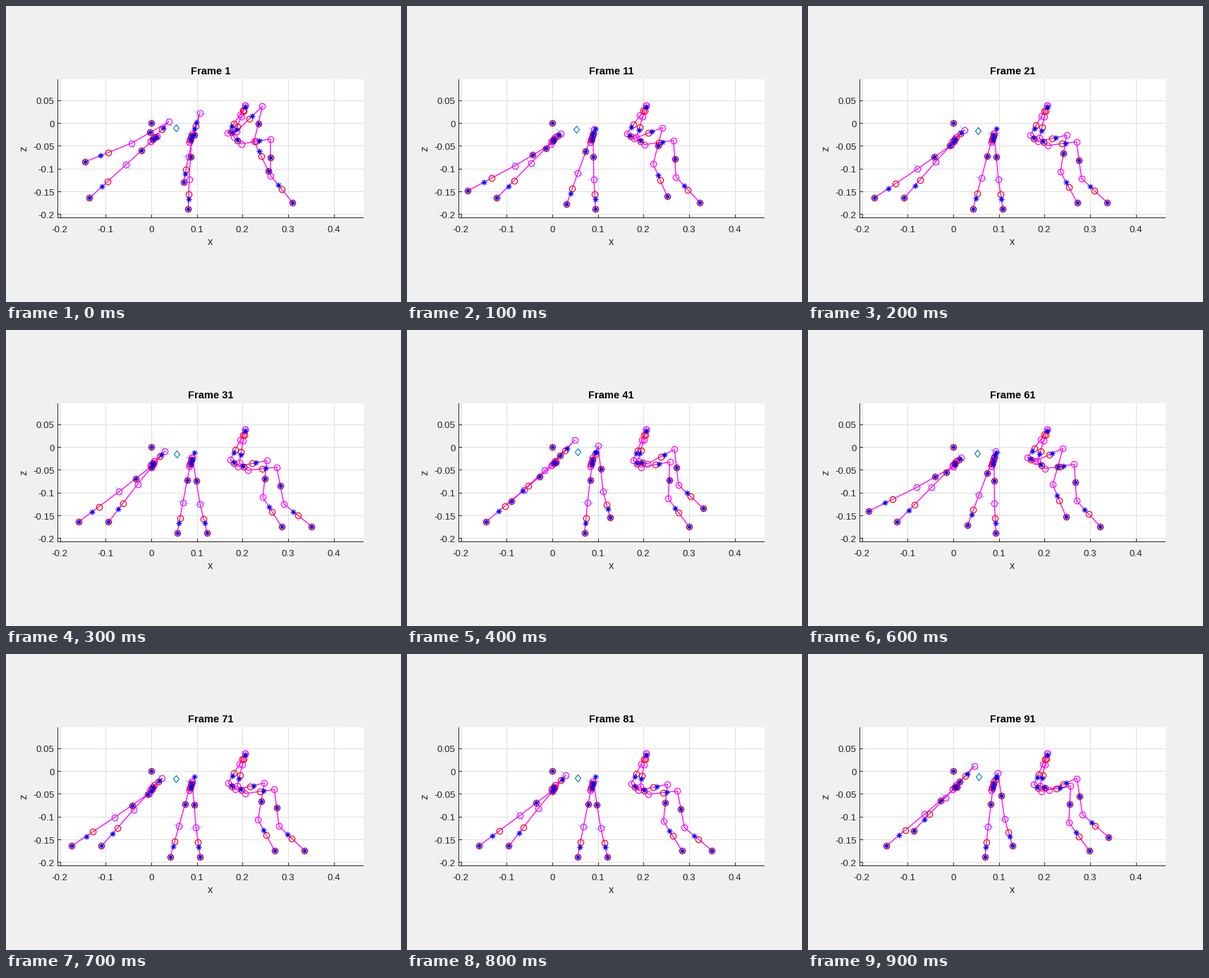
A matplotlib script that plays this animation: 560x420 px, repeating every 1000 ms.

```python
import numpy as np
import matplotlib.pyplot as plt
from collections import namedtuple
from matplotlib.animation import FuncAnimation
from matplotlib.patches import Rectangle

W, H = 560, 420
PT = 0.9            # points per pixel at 80 dpi
FRAMES, PERIOD = 10, 51
SPEED = 0.9         # pixels a planted foot travels per step
INK, GRID = "#262626", "#dfdfdf"

plt.rcParams["font.family"] = "Liberation Sans"

# A joint rests at (x, y) and follows its foot: per pixel of travel and per pixel of lift.
Joint = namedtuple("Joint", "rest travel lift")
# "land" is where the foot touches down, "pull" how far it is drawn back per pixel of lift.
Pair = namedtuple("Pair", "base joints foot_rest land ground height pull stars")
# The two sides differ in when they step and how early in the swing the foot peaks.
Side = namedtuple("Side", "lift_off swing skew shift")

REAR_STARS = (0.55, 0.62, 0.5, 0.66)
HIND = Pair([(205, 192), (210, 186)],
            [Joint((213, 185), (0.43, -0.5), (0.38, -0.47)),
             Joint((169, 225), (0.62, -0.25), (0.24, -0.63))],
            117, 86, 272, 52, 0, REAR_STARS)
MIDDLE = Pair([(260, 193), (262, 187)],
              [Joint((263, 181), (0.03, 0), (0.3, -0.77)),
               Joint((259, 245), (0.57, 0.05), (0.07, -0.82))],
              257.5, 226, 288, 39, 0, REAR_STARS)
FRONT = Pair([(339, 141)],
             [Joint((333, 156), (0.09, 0.03), (0.03, -0.03)),
              Joint((322, 185), (0.3, 0.1), (0.03, -0.04)),
              Joint((333, 195), (0.33, 0.13), (0.1, -0.29)),
              Joint((374, 188), (0.33, 0.22), (0, -0.85)),
              Joint((374, 240), (0.7, 0.22), (0.02, -0.9))],
             405, 374, 278.5, 46, -0.62, (0.1, 0.65, 0.45, 0.62, 0.5, 0.34))
SIDES = [Side(45, 19, 0.6, 0), Side(36, 15, 1.5, 31)]

ORIGIN, THORAX = (206, 166), (267, 174)
GAP = [(np.nan, np.nan)]


def smoothstep(t):
    t = np.clip(t, 0, 1)
    return t * t * (3 - 2 * t)


def foot_motion(pair, side, phase):
    """Foot x and lift: an even stance, then a swing back to the landing point."""
    stance = PERIOD - side.swing
    step = (phase - side.lift_off - side.swing) % PERIOD
    u = max(0, step - stance) / side.swing
    lift = pair.height * np.sin(np.pi * u ** side.skew)
    travel = SPEED * min(step, stance) * (1 - smoothstep((u - 0.25) / 0.55))
    return pair.land + side.shift + travel + pair.pull * lift, lift


def leg_points(pair, side, phase):
    x, lift = foot_motion(pair, side, phase)
    joints = [np.array(j.rest) + (x - pair.foot_rest) * np.array(j.travel)
              + lift * np.array(j.lift) for j in pair.joints]
    return np.array([*pair.base, *joints, (x, pair.ground - lift)])


def body_centre(phase):
    turn = 2 * np.pi / PERIOD
    return [(240.5 - np.cos(turn * (phase - 10)), 174.3 - 2.4 * np.cos(turn * (phase + 2)))]


def joint_axis(joint, end, half=8):
    """Short stroke through a joint, square to the segment that follows."""
    dx, dy = end - joint
    normal = half * np.array([-dy, dx]) / np.hypot(dx, dy)
    return [joint - normal, joint + normal] + GAP


fig = plt.figure(figsize=(W / 80, H / 80), dpi=80, facecolor="#f0f0f0")
ax = fig.add_axes([0, 0, 1, 1])
# Whole numbers fall just short of pixel centres, so markers round onto them.
ax.set_xlim(-0.49, W - 0.49)
ax.set_ylim(H - 0.49, -0.49)
ax.axis("off")


def stroke(xs, ys, color):
    ax.plot(np.round(xs), np.round(ys), color=color, lw=PT, snap=False, zorder=1,
            solid_capstyle="projecting")


def label(x, y, text, size=13.33, color=INK, **kw):
    return ax.text(x - 0.8, y, text, fontsize=size * PT, color=color, **kw)


LEFT, RIGHT, TOP, BOTTOM = 73, 506, 104, 300
ax.add_patch(Rectangle((LEFT - 0.5, TOP - 0.5), RIGHT - LEFT + 1, BOTTOM - TOP + 1,
                       fc="white", ec="none", zorder=0))
x_ticks = [(206 + 64.7 * n, f"{n / 10:g}") for n in range(-2, 5)]
y_ticks = [(166 - 32.35 * n, f"{n / 20:g}") for n in range(-4, 2)]
for x, text in x_ticks:
    stroke([x, x], [TOP, BOTTOM], GRID)
    label(x, 320.5, text, ha="center", va="baseline")
for y, text in y_ticks:
    stroke([LEFT, RIGHT], [y, y], GRID)
    label(69, y + 5.3, text, ha="right", va="baseline")
for x, _ in x_ticks:
    stroke([x, x], [BOTTOM, BOTTOM - 4], INK)
for y, _ in y_ticks:
    stroke([LEFT, LEFT + 4], [y, y], INK)
stroke([LEFT, LEFT], [TOP, BOTTOM], INK)
stroke([LEFT, RIGHT], [BOTTOM, BOTTOM], INK)
label(290, 339, "x", 14.67, ha="center", va="baseline")
label(25.5, 202, "z", 14.67, ha="center", va="center", rotation=90)
title = label(290, 97, "", 14.67, "black", ha="center", va="baseline", weight="bold")


def layer(color, z, width=1.2, marker=None, size=8.4):
    return ax.plot([], [], color=color, lw=0 if marker else width * PT, marker=marker,
                   ms=size * PT, mfc="none", mew=width * PT, zorder=z)[0]


axes_marks = layer("cyan", 2, 0.8)
bones = layer("magenta", 3, 1.3)
joints = layer("magenta", 4, marker="o")
reds = layer("red", 5, marker="o")
stars = layer("blue", 6, 1, marker=(8, 2, 0), size=7.6)
centre = layer("#0072bd", 7, 1.1, marker=[(0, 1), (0.8, 0), (0, -1), (-0.8, 0), (0, 1)], size=10)


def update(k):
    number = 1 + 10 * k
    phase = number % PERIOD
    lines, rings, red, star, ticks = [], [], [ORIGIN], [ORIGIN, THORAX], []
    for pair in (HIND, MIDDLE, FRONT):
        for side in SIDES:
            leg = leg_points(pair, side, phase)
            lines += list(leg) + GAP
            rings += list(leg[:-1])
            red += list((leg[:-1] + leg[1:]) / 2) + [leg[-1]]
            star += [a + f * (b - a) for a, b, f in zip(leg, leg[1:], pair.stars)] + [leg[-1]]
            if pair is not FRONT:
                ticks += joint_axis(leg[-2], leg[-1]) + joint_axis(leg[-3], leg[-2])
    for artist, points in ((axes_marks, ticks), (bones, lines), (joints, rings),
                           (reds, red), (stars, star), (centre, body_centre(phase))):
        artist.set_data(*np.array(points).T)
    title.set_text(f"Frame {number}")
    return axes_marks, bones, joints, reds, stars, centre, title


anim = FuncAnimation(fig, update, frames=FRAMES, interval=100, repeat=True, repeat_delay=0)
plt.show()
```
